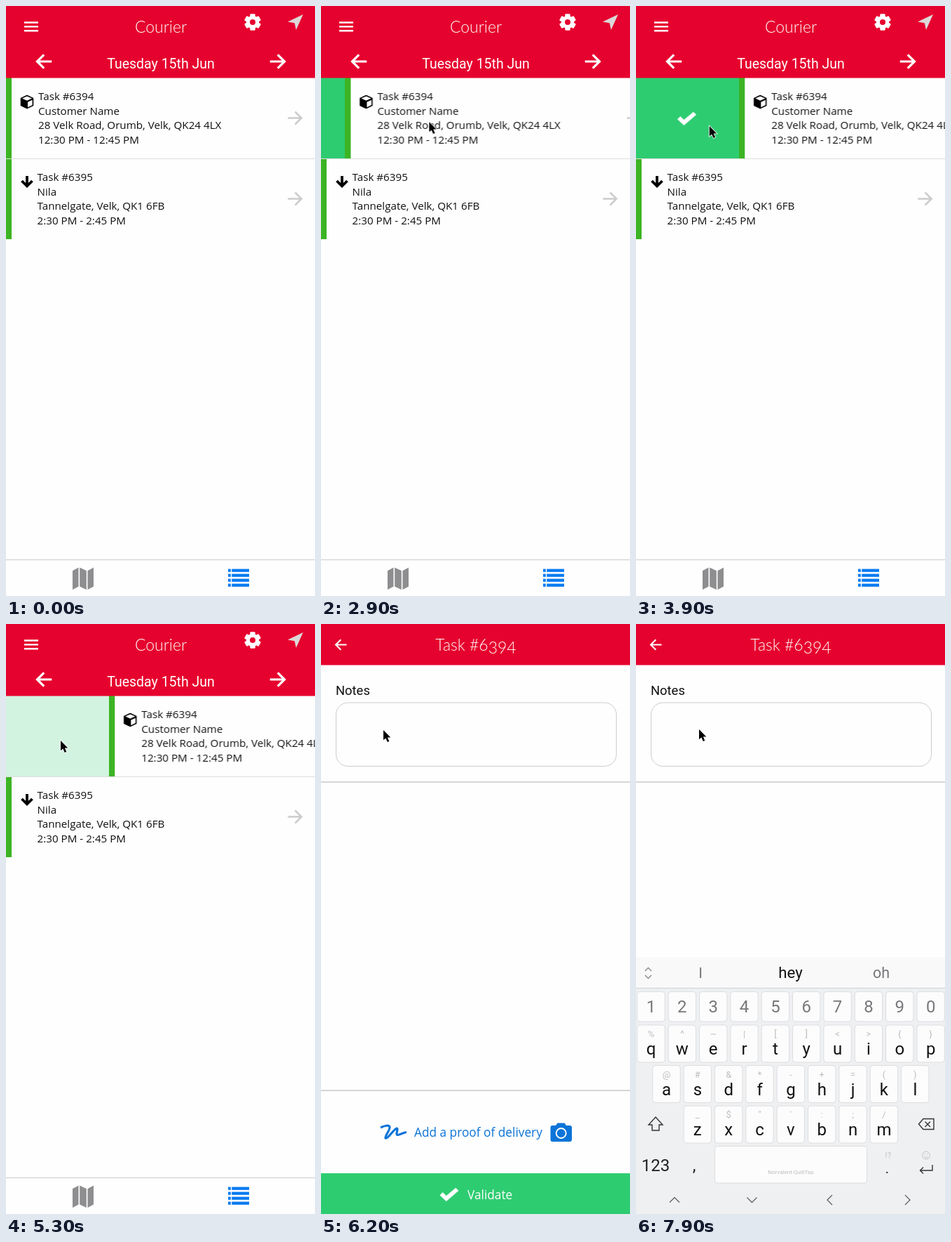
An HTML page that plays this animation: 441 by 840 pixels, repeating every 8000 ms.

```html
<!DOCTYPE html>
<html lang="en">
<head>
<meta charset="utf-8">
<title>Courier tasks</title>
<style>
html, body { margin: 0; width: 100%; height: 100%; overflow: hidden; background: #fefefe; }
svg { display: block; width: 441px; height: 840px; }
.title { font: 300 23px Lato, sans-serif; fill: #fff; text-anchor: middle; }
.date { font: 19.5px Roboto, sans-serif; fill: #fff; text-anchor: middle; }
.row { font: 15.2px "Open Sans", sans-serif; fill: #111; }
.action { font: 17.25px "Open Sans", sans-serif; }
.label { font: 18.4px Roboto, sans-serif; fill: #111; }
.line { fill: none; stroke-linecap: butt; stroke-linejoin: miter; }
.keys text { font-family: Roboto, sans-serif; text-anchor: middle; }
.keys rect { fill: #fcfcfd; stroke: #dcdde0; }

.card, .done, .tick, .form, .keys, .caret, .cursor { animation: 8s linear infinite; }
.card { animation-name: swipe; }
.done { animation-name: press; }
.tick { animation-name: vanish; }
.form { animation-name: open; }
.keys { animation-name: rise; }
.caret { animation-name: blink; animation-timing-function: step-end; }
.cursor { animation-name: move; }

@keyframes swipe {
  0%, 33.75% { transform: translateX(0); }
  35% { transform: translateX(9px); }
  36.25% { transform: translateX(34px); }
  37.5% { transform: translateX(80px); }
  38.75% { transform: translateX(118px); }
  40% { transform: translateX(138px); }
  41.25% { transform: translateX(145px); }
  43%, 100% { transform: translateX(147.3px); }
}
@keyframes press {
  0%, 63.75% { opacity: 1; }
  66.2%, 100% { opacity: .2; }
}
@keyframes vanish {
  0%, 63.75% { opacity: 1; }
  66.2%, 100% { opacity: 0; }
}
@keyframes open {
  0%, 66.9% { opacity: 0; transform: translateY(60px); animation-timing-function: ease-out; }
  72%, 100% { opacity: 1; transform: none; }
}
@keyframes rise {
  0%, 80.6% { transform: translateY(370px); animation-timing-function: ease-out; }
  86.25%, 100% { transform: none; }
}
@keyframes blink {
  0% { opacity: 0; }
  81.25% { opacity: 1; }
  87.4% { opacity: 0; }
  92.5% { opacity: 1; }
  98.7%, 100% { opacity: 0; }
}
@keyframes move {
  0%, 7.49% { opacity: 0; transform: translate(275px, 500px); }
  7.5% { opacity: 1; transform: translate(275px, 500px); }
  12.5% { transform: translate(192px, 372px); }
  17.5% { transform: translate(170px, 299px); }
  18.7% { transform: translate(152px, 268px); }
  21.25%, 23.75% { transform: translate(92px, 173px); }
  26.25%, 28.75% { transform: translate(95px, 166px); }
  31.25%, 33.75% { transform: translate(57px, 162px); }
  36.25% { transform: translate(154px, 165px); }
  39.4%, 43.75% { transform: translate(235px, 172px); }
  48.75% { transform: translate(105px, 171px); }
  52.5% { transform: translate(48px, 160px); }
  56.25% { transform: translate(60px, 164px); }
  66.25% { transform: translate(78px, 166px); }
  72.5%, 75% { transform: translate(78px, 151px); }
  77.5% { transform: translate(89px, 151px); }
  78.75%, 100% { opacity: 1; transform: translate(90px, 150px); }
}
</style>
</head>
<body>
<svg viewBox="0 0 441 840">
  <defs>
    <path id="arrow" class="line" d="M-10.7 0H9M-.4-9L8.7 0L-.4 9"/>
    <path id="check" d="M-13.5 1.2L-9.3-3L-4.2 1.9L9.3-9.3L13.5-5.2L-4.2 10Z"/>
  </defs>

  <!-- task list -->
  <rect width="441" height="840" fill="#fefefe"/>
  <rect class="done" y="102" width="148" height="115.5" fill="#2ecc71"/>
  <use class="tick" href="#check" x="72.6" y="160" fill="#fff"/>
  <g class="card">
    <rect y="102" width="441" height="115" fill="#fefefe"/>
    <rect y="102" width="8" height="115" fill="#3cb424"/>
    <path d="M30 127.5L38.5 131.5V141.5L30 145.5L21.5 141.5V131.5Z" fill="#000" stroke="#000" stroke-width="1.5" stroke-linejoin="round"/>
    <path d="M30 128.4L37 131.6L30 134.8L23 131.6ZM31 136.8L37.6 133.7V141L31 144.2Z" fill="#fefefe"/>
    <g class="row">
      <text x="46" y="134">Task #6394</text>
      <text x="46" y="155">Customer Name</text>
      <text x="46" y="175">28 Velk Road, Orumb, Velk, QK24 4LX</text>
      <text x="46" y="196">12:30 PM - 12:45 PM</text>
    </g>
    <use href="#arrow" x="413" y="159.5" stroke="#ccc" stroke-width="2.5"/>
  </g>
  <path d="M0 217.5H441" stroke="#dedede"/>
  <g>
    <rect y="218" width="8" height="114" fill="#3cb424"/>
    <path class="line" d="M30 242V255.5M22.5 249L30 256.3L37.5 249" stroke="#000" stroke-width="3.8"/>
    <g class="row">
      <text x="44.5" y="249">Task #6395</text>
      <text x="44.5" y="270">Nila</text>
      <text x="44.5" y="290">Tannelgate, Velk, QK1 6FB</text>
      <text x="44.5" y="311">2:30 PM - 2:45 PM</text>
    </g>
    <use href="#arrow" x="413" y="274.5" stroke="#ccc" stroke-width="2.5"/>
  </g>

  <rect width="441" height="102.5" fill="#e6022e"/>
  <path d="M26 23.5H46M26 29.4H46M26 35.3H46" stroke="#fff" stroke-width="2.4"/>
  <text class="title" x="221" y="37.5">Courier</text>
  <g transform="translate(352 23)" fill="#fff">
    <circle r="9.2"/>
    <rect id="tooth" x="-3.7" y="-11.8" width="7.4" height="23.6" rx="1.3"/>
    <use href="#tooth" transform="rotate(60)"/>
    <use href="#tooth" transform="rotate(120)"/>
    <circle r="4" fill="#e6022e"/>
  </g>
  <path d="M424 12L402 22.5L411.8 24.3L414 34Z" fill="#dcd8d8"/>
  <use href="#arrow" transform="translate(53.8 79) scale(-1.07)" stroke="#fff" stroke-width="3"/>
  <use href="#arrow" transform="translate(388.2 79) scale(1.07)" stroke="#fff" stroke-width="3"/>
  <text class="date" x="221" y="89">Tuesday 15th Jun</text>

  <path d="M0 788.5H441" stroke="#ccc"/>
  <path d="M95 804L103.5 799.5V826.5L95 831ZM105.2 799.5L114.8 804V831L105.2 826.5ZM116.5 804L125 799.5V826.5L116.5 831Z" fill="#8e8e90"/>
  <path d="M317 803.6H347M317 810.6H347M317 817.6H347M317 824.6H347" stroke="#077af0" stroke-width="4.2" stroke-dasharray="3.8 1.4 30"/>

  <!-- task form -->
  <g class="form">
    <rect width="441" height="900" fill="#fefefe"/>
    <rect width="441" height="58.5" fill="#e6022e"/>
    <use href="#arrow" transform="translate(28 29.5) scale(-.8)" stroke="#fff" stroke-width="2.6"/>
    <text class="title" x="221" y="37.5">Task #6<tspan dy="4">394</tspan></text>
    <text class="label" x="21" y="101">Notes</text>
    <rect x="21.5" y="112" width="400" height="90.5" rx="17" fill="#fefefe" stroke="#ccc"/>
    <path d="M0 225H441M0 664.3H441" stroke="#c9c9c9" stroke-width="1.5"/>
    <g class="action" fill="#0c74d8">
      <path class="line" d="M85 717C91 714 97 713 98 716C99 720 91 729 92 732C95 734 104 719 108 718C111 718 106 727 109 727.5C112 728 117 724 122 723.5" stroke="#0c74d8" stroke-width="3.2"/>
      <text x="133" y="730">Add a proof of delivery</text>
      <path d="M330 714H335L337.5 710.5H347.5L350 714H355Q358 714 358 717V734Q358 737 355 737H330Q327.5 737 327.5 734V717Q327.5 714 330 714Z"/>
      <circle cx="342.7" cy="725" r="7" fill="none" stroke="#fff" stroke-width="1.9"/>
    </g>
    <rect y="782" width="441" height="118" fill="#2ecc71"/>
    <use href="#check" x="183" y="812" fill="#fff"/>
    <text class="action" x="209" y="818.5" fill="#fff">Validate</text>
  </g>
  <rect class="caret" x="37.5" y="146" width="2" height="23" fill="#333"/>

  <g class="keys" id="keys">
    <path d="M0 474H441V840H0Z" fill="#eff0f2"/>
    <path d="M0 474H441V518H0Z" fill="#f9f9fa"/>
    <path d="M0 518.5H441" stroke="#d8d9dc" stroke-width="1.5"/>
    <g class="line" stroke="#666" stroke-width="1.4">
      <path d="M13 494L17.5 489.5L22 494M13 500L17.5 504.5L22 500" stroke="#888"/>
      <path d="M48 823.5L55 816.5L62 823.5M158.5 816.5L165.5 823.5L172.5 816.5M280 813L273 820L280 827M384 813L391 820L384 827"/>
      <path d="M28 702L38 713H33V721H23V713H18Z" stroke="#333"/>
      <path d="M410 704.5H425V719.5H410L403.5 712ZM412.5 708.5L420 716M420 708.5L412.5 716" stroke="#333"/>
      <path d="M423 770V778H405.5M410 773.5L405.5 778L410 782.5" stroke="#333"/>
      <g stroke="#c4c4c6" stroke-width="1">
        <circle cx="414" cy="756.5" r="5.5"/>
        <path d="M411 758Q414 761.5 417 758M412 754V755.5M416 754V755.5"/>
      </g>
    </g>
  </g>

  <path class="cursor" d="M0 0V14.3L3.3 11.4L5.8 17L8.3 15.9L5.9 10.5H10.3Z" fill="#000" stroke="#fff" stroke-width="1.6" paint-order="stroke"/>
</svg>
<script>
const keys = document.getElementById("keys");

function add(tag, attrs, text = "") {
  const el = document.createElementNS("http://www.w3.org/2000/svg", tag);
  for (const name in attrs) el.setAttribute(name, attrs[name]);
  el.textContent = text;
  keys.append(el);
}
const label = (text, x, y, size, fill) => add("text", { x, y, fill, "font-size": size }, text);
const key = (x, y, width, height) => add("rect", { x, y, width, height, rx: 4 });

function keyRow(chars, hints, x0, top, height, base, fill) {
  [...chars].forEach((char, i) => {
    const x = x0 + i * 44.35;
    key(x - 19.7, top, 39.4, height);
    if (hints) label(hints[i], x, top + 17, 13, "#bdbdc0");
    label(char, x, base, 24, fill);
  });
}

keyRow("1234567890", "", 21.5, 523.5, 42.5, 553, "#77787a");
keyRow("qwertyuiop", "%^~|[]<>{}", 21.5, 571, 53, 613, "#111");
keyRow("asdfghjkl", "@#&*-+=()", 43.5, 628.5, 53, 670.5, "#111");
keyRow("zxcvbnm", "_$\"':;/", 87.8, 686, 53, 728, "#111");

key(112.5, 743.5, 217, 52.5);
label("Norvalent QuillTap", 221, 783, 8, "#bcbcbf");
label("123", 28, 779, 24, "#222");
label(",", 83, 779, 24, "#222");
label(".", 358.5, 782, 20, "#222");
label("!?", 360, 761, 12, "#c4c4c6");
label("I", 92, 504, 21, "#77787a");
label("hey", 220.5, 504, 22.3, "#111");
label("oh", 350, 504, 21.5, "#77787a");
</script>
</body>
</html>
```
